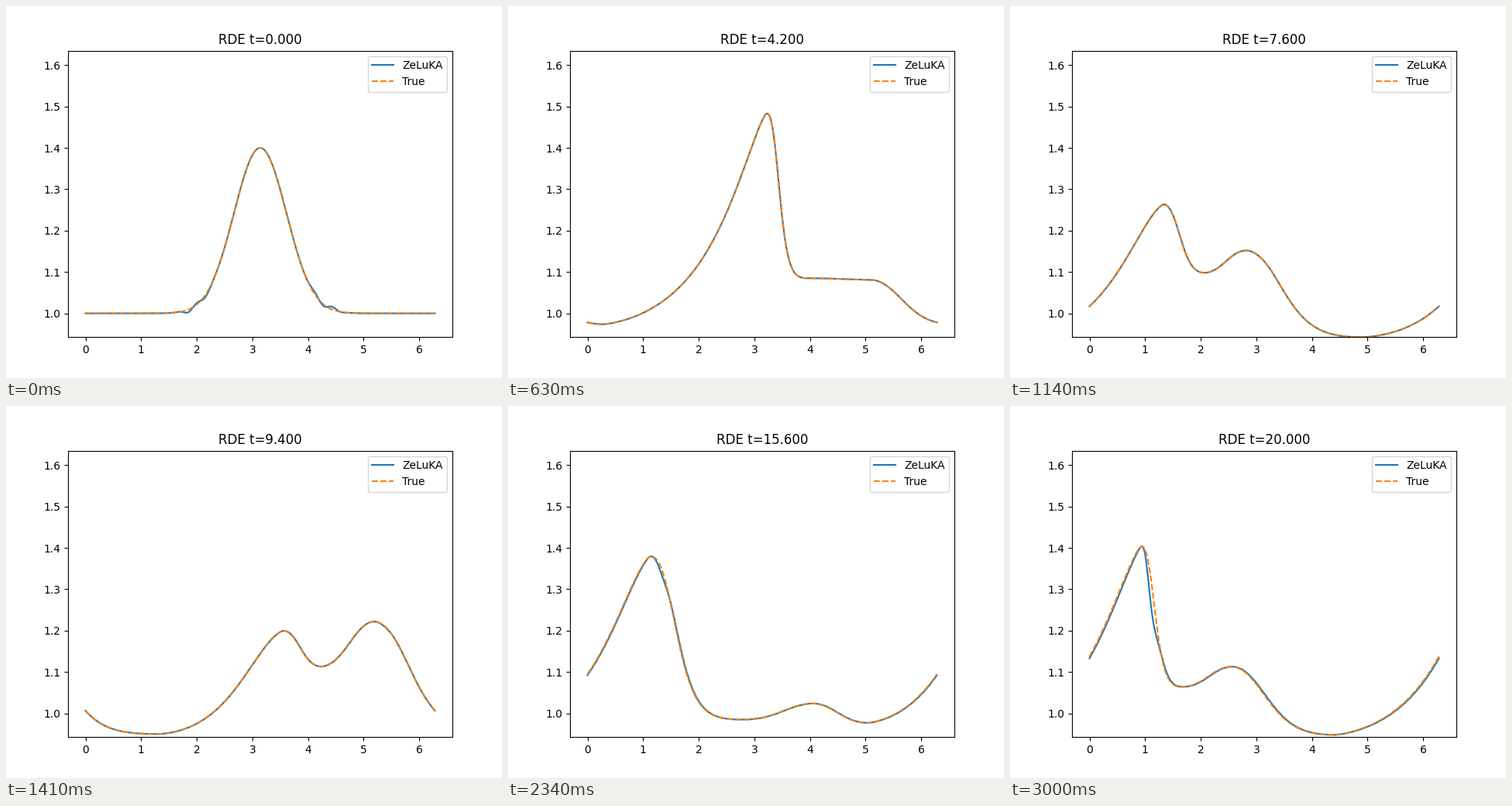
Animation of 640x480 px, one loop 3030 ms. Source, as a matplotlib script:

```python
import numpy as np
import matplotlib.pyplot as plt
from matplotlib.animation import FuncAnimation

TAU = 2 * np.pi
FRAMES, INTERVAL, DT = 101, 30, 0.2
x = np.linspace(0, TAU, 512)

# Unwrapped positions and heights of the two crests and the troughs ahead
key_t = np.array([0, 2.6, 5.8, 9.4, 12.4, 15.6, 20])
positions = np.array([
    [.6, 3.4, 6.88, 11.46, 15.5, 19.98, 26.07],         # rear crest
    [1.6, 4.72, 8.58, 13.87, 17.77, 21.65, 26.8],
    [np.pi, 7.245, 11.61, 16.13, 19.6, 22.9, 27.68],    # front crest
    [4, 7.98, 12.35, 16.8, 20.21, 23.88, 29.52],
])
heights = np.array([
    [1.08, 1.082, 1.097, 1.222, 1.311, 1.38, 1.405],
    [1, 1, .947, .95, .954, .985, 1.064],
    [1.65, 1.6, 1.355, 1.2, 1.076, 1.024, 1.113],
    [1.1, 1.101, 1.077, 1.113, 1.052, .977, .948],
])
tracks = np.vstack([positions, heights]).T


def spline(xk, yk, at):
    """Natural cubic spline through the rows of yk, evaluated at one point."""
    n, h = len(xk), np.diff(xk)
    slope = np.diff(yk, axis=0) / h[:, None]
    system, rhs = np.eye(n), np.zeros_like(yk)
    for i in range(1, n - 1):
        system[i, i - 1:i + 2] = h[i - 1], 2 * (h[i - 1] + h[i]), h[i]
        rhs[i] = 6 * (slope[i] - slope[i - 1])
    curv = np.linalg.solve(system, rhs)
    i = int(np.clip(np.searchsorted(xk, at) - 1, 0, n - 2))
    a = (xk[i + 1] - at) / h[i]
    b = 1 - a
    bend = (a**3 - a) * curv[i] + (b**3 - b) * curv[i + 1]
    return a * yk[i] + b * yk[i + 1] + bend * h[i]**2 / 6


def ease(s, power, bias):
    """Skewed S-curve from 0 to 1."""
    s = np.clip(s, 1e-6, 1 - 1e-6)
    return 1 / (1 + np.exp(bias) * ((1 - s) / s)**power)


def smoothstep(s):
    s = np.clip(s, 0, 1)
    return s * s * (3 - 2 * s)


def wrap(d):
    return (d + np.pi) % TAU - np.pi


def profile(xs, pos, level):
    """Steep fronts and long ramps joining crests and troughs."""
    u = pos[0] + (xs - pos[0]) % TAU
    pos, level = np.append(pos, pos[0] + TAU), np.append(level, level[0])
    y = np.full_like(xs, level[0])
    for i in range(4):
        span, step = pos[i + 1] - pos[i], level[i + 1] - level[i]
        size = abs(step)
        if i % 2 == 0:
            power, bias = 1.6 + 1.6 * size, 0.3 - 4.2 * size - 0.35 * span
        else:
            power, bias = 1.7 - 0.75 * size, 0.6 * span - 0.4
        y += step * ease((u - pos[i]) / span, power, bias)
    return y


def wave(xs, t):
    """Initial Gaussian pulse that ignites into the travelling waves."""
    state = spline(key_t, tracks, t)
    pos, level = state[:4], state[4:]
    # a narrow average stands in for viscosity
    burn = np.mean([profile(xs + o, pos, level)
                    for o in np.linspace(-.03, .03, 5)], axis=0)
    pulse = 1 + 0.4 * np.exp(-2.25 * wrap(xs - pos[2])**2)
    mix = smoothstep(t / 1.6)
    return mix * burn + (1 - mix) * pulse


def solve(t):
    """Model and exact curves; the model's phase error grows with time."""
    true = wave(x, t)
    rear, front = spline(key_t, positions[[0, 2]].T, t)
    shock = np.exp(-((wrap(x - rear) - .17) / .15)**2)
    guess = wave(x - .02 * (t / 20)**2 * (1 - 4 * shock), t)
    # ripples on the flanks of the initial pulse
    d = wrap(x - front)
    flank = np.exp(-((abs(d) - 1.15) / .25)**2 - 2 * t)
    guess += .01 * np.sign(d) * flank * (.3 + .7 * np.cos(17 * (abs(d) - .95)))
    return guess, true


fig, ax = plt.subplots(figsize=(6.4, 4.8), dpi=100)
first_guess, first_true = solve(0)
model_line, = ax.plot(x, first_guess, label="ZeLuKA")
true_line, = ax.plot(x, first_true, "--", label="True")
ax.set_ylim(0.9427, 1.6349)
ax.legend(loc="upper right")
title = ax.set_title("RDE t=0.000")


def draw(i):
    t = i * DT
    guess, true = solve(t)
    model_line.set_ydata(guess)
    true_line.set_ydata(true)
    title.set_text(f"RDE t={t:.3f}")
    return model_line, true_line, title


anim = FuncAnimation(fig, draw, frames=FRAMES, interval=INTERVAL,
                     repeat=True, repeat_delay=0, blit=False)
plt.show()
```
